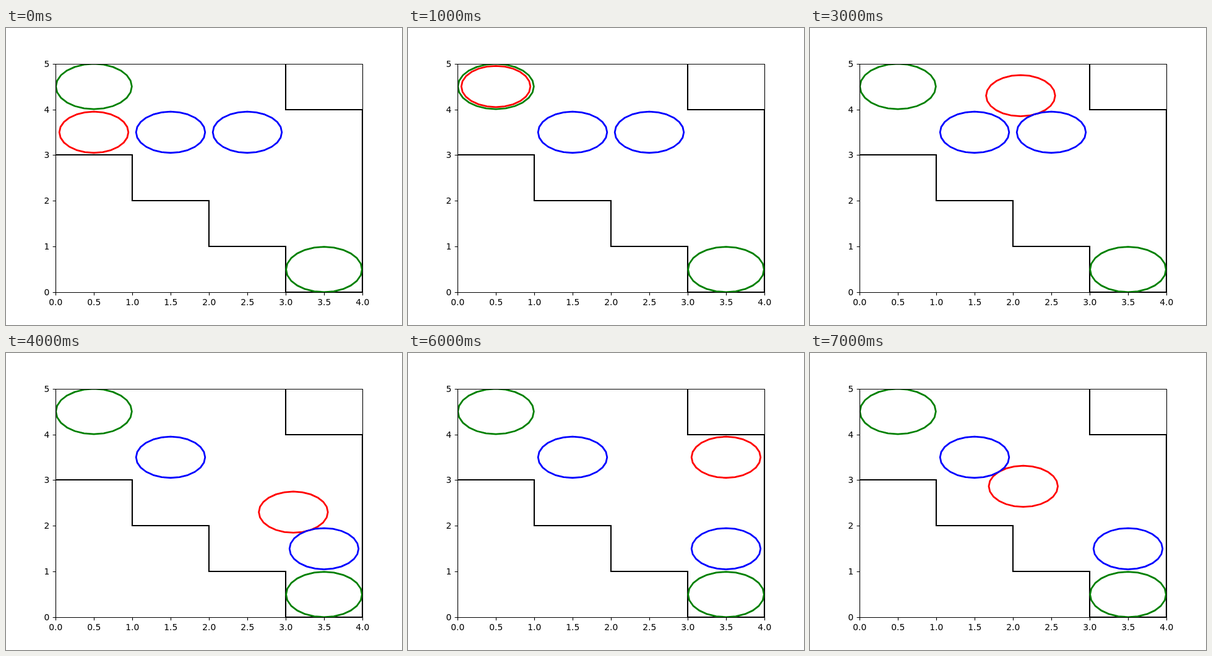
These frames come from a looping animation (640 by 480 pixels, 8 s). An HTML page:

```html
<!DOCTYPE html>
<html lang="en">
<head>
<meta charset="utf-8">
<title>Moving discs in a stepped region</title>
<style>
  html, body { margin: 0; width: 640px; height: 480px; overflow: hidden; background: #fff; }
  svg { display: block; }
  text { font: 13.89px "DejaVu Sans", sans-serif; }
  path, polygon { fill: none; stroke-linejoin: round; }
  #discs polygon { stroke-width: 2.78; }
</style>
</head>
<body>
<svg width="640" height="480" viewBox="0 0 640 480">
  <clipPath id="plot"><rect x="80" y="58" width="497" height="370"/></clipPath>
  <g clip-path="url(#plot)">
    <path id="wall" stroke="#000" stroke-width="2.08" style="stroke-linejoin:miter"/>
    <g id="discs"></g>
  </g>
  <path id="axes" stroke="#000" stroke-width="1.11"/>
  <g id="labels"></g>
</svg>
<script>
const SVG_NS = "http://www.w3.org/2000/svg";
const byId = id => document.getElementById(id);
const px = x => 80 + 124 * x;
const py = y => 427.2 - 73.92 * y;
const snap = v => Math.floor(v + 0.5);

function add(parent, tag, attrs, text = "") {
  const el = document.createElementNS(SVG_NS, tag);
  for (const name in attrs) el.setAttribute(name, attrs[name]);
  el.textContent = text;
  return byId(parent).appendChild(el);
}

function addDisc(color, radius, x = 0, y = 0) {
  const points = Array.from({ length: 24 }, (_, i) => {
    const a = i * Math.PI / 12;
    return [124 * radius * Math.cos(a), 73.92 * radius * Math.sin(a)];
  });
  const disc = add("discs", "polygon", { points: points.join(" "), stroke: color });
  place(disc, [x, y]);
  return disc;
}

function place(disc, [x, y]) {
  disc.setAttribute("transform", `translate(${px(x)} ${py(y)})`);
}

// Stepped boundary
const corners = [[0, 3], [1, 3], [1, 2], [2, 2], [2, 1], [3, 1], [3, 0], [4, 0], [4, 4], [3, 4], [3, 5]];
byId("wall").setAttribute("d", "M" + corners.map(([x, y]) => [snap(px(x)), snap(py(y))]).join("L"));

// Frame, ticks and labels
let axes = "M80.5 58.5H576.5V427.5H80.5Z";
for (let x = 0; x <= 4; x += 0.5) {
  axes += `M${px(x) + 0.5} 427.5v4.86`;
  add("labels", "text", { x: px(x) + 0.3, y: 448, "text-anchor": "middle" }, x.toFixed(1));
}
for (let y = 0; y <= 5; y++) {
  axes += `M80.5 ${snap(py(y)) + 0.5}h-4.86`;
  add("labels", "text", { x: 70.3, y: Math.round(py(y) + 5), "text-anchor": "end" }, y);
}
byId("axes").setAttribute("d", axes);

addDisc("green", 0.495, 0.5, 4.5);
addDisc("green", 0.495, 3.5, 0.5);
const mover = addDisc("red", 0.45);
addDisc("blue", 0.45, 1.5, 3.5);
const pushed = addDisc("blue", 0.45);

// One position per second
const stops = [[0.5, 3.5], [0.5, 4.5], [1.5, 4.5], [2.1, 4.3], [3.1, 2.3], [2.5, 3.5], [3.5, 3.5], [2.135, 2.865]];

function draw(now) {
  const step = Math.floor(now / 1000) % stops.length;
  place(mover, stops[step]);
  place(pushed, step < 4 ? [2.5, 3.5] : [3.5, 1.5]);
  requestAnimationFrame(draw);
}
draw(0);
</script>
</body>
</html>
```
